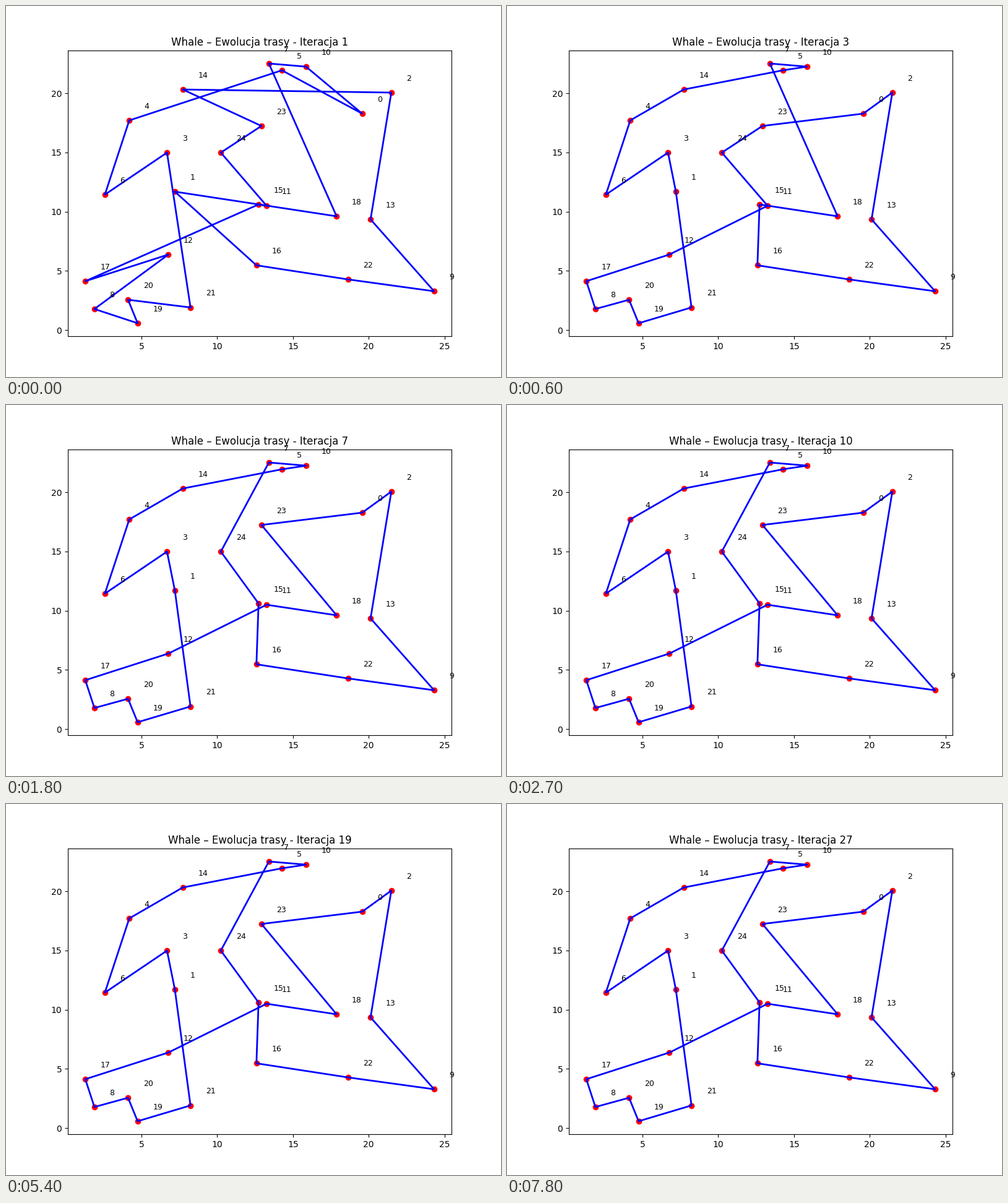
A matplotlib script that plays this animation: 800 px wide and 600 px high, repeating every 8 s.

```python
import matplotlib.pyplot as plt
from matplotlib.animation import FuncAnimation

TICK_MS = 100
TICKS_PER_ITERATION = 3
LOOP_MS = 8000

# City number and position, listed in the order of the best tour.
CITIES = {
    1: (7.21, 11.69), 21: (8.24, 1.91), 19: (4.75, 0.58), 20: (4.12, 2.56),
    8: (1.90, 1.78), 17: (1.30, 4.13), 12: (6.78, 6.38), 11: (13.26, 10.50),
    18: (17.88, 9.61), 23: (12.92, 17.24), 0: (19.57, 18.28),
    2: (21.49, 20.06), 13: (20.12, 9.35), 9: (24.31, 3.28),
    22: (18.63, 4.28), 16: (12.59, 5.47), 15: (12.73, 10.61),
    24: (10.24, 14.99), 7: (13.41, 22.515), 10: (15.86, 22.25),
    5: (14.27, 21.94), 14: (7.73, 20.32), 4: (4.20, 17.71),
    6: (2.59, 11.44), 3: (6.69, 14.99),
}


def rearranged(tour, moves):
    """Copy a tour, taking each city out and putting it behind another."""
    tour = list(tour)
    for city, previous in moves.items():
        tour.remove(city)
        tour.insert(tour.index(previous) + 1, city)
    return tour


def closed_path(tour):
    return zip(*(CITIES[city] for city in [*tour, tour[0]]))


# Earlier tours are worse variants of the best one.
best = list(CITIES)
good = rearranged(best, {24: 11, 18: 15})
fair = rearranged(good, {1: 17, 12: 3, 0: 10, 5: 15, 18: 13, 22: 2})
poor = rearranged(good, {19: 20, 12: 8, 15: 17, 1: 16, 14: 23, 0: 10})
TOURS = {1: poor, 2: fair, 3: good, 7: best}  # keyed by first iteration

fig, ax = plt.subplots(figsize=(8, 6), dpi=100)
ax.scatter(*zip(*CITIES.values()), c="red")
for number, (x, y) in CITIES.items():
    ax.text(x + 1, y + 1, str(number), fontsize=9)
route, = ax.plot(*closed_path(poor), "b-", linewidth=2)
title = ax.set_title("")


def update(tick):
    iteration = tick // TICKS_PER_ITERATION + 1
    found = max(start for start in TOURS if start <= iteration)
    route.set_data(*closed_path(TOURS[found]))
    title.set_text(f"Whale – Ewolucja trasy - Iteracja {iteration}")
    return route, title


animation = FuncAnimation(fig, update, frames=LOOP_MS // TICK_MS,
                          interval=TICK_MS, repeat=True, repeat_delay=0)
plt.show()
```
